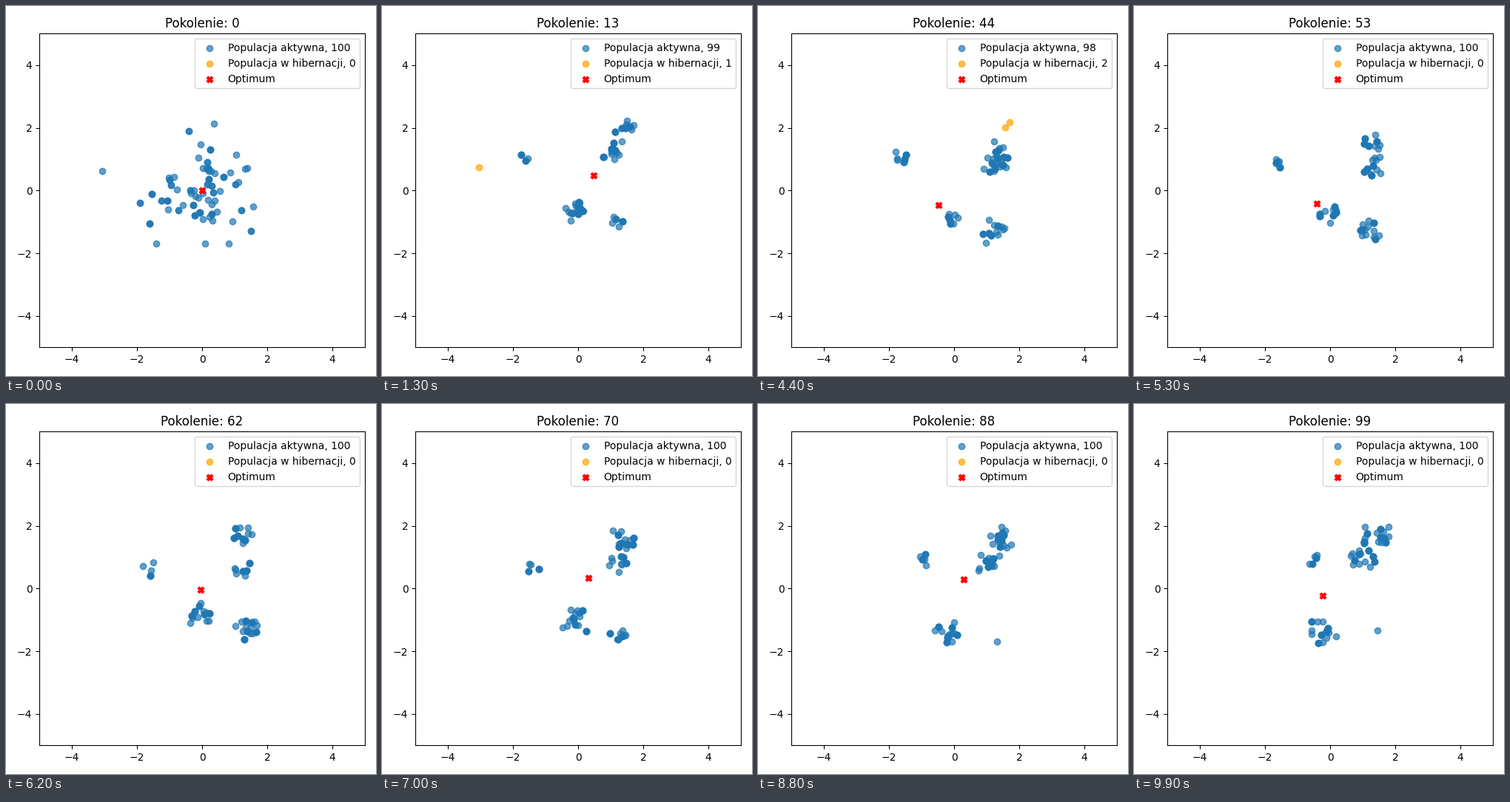
Write a matplotlib script that moves like this. It is 500 px wide and 500 px high and loops after 10 s.

```python
import numpy as np
import matplotlib.pyplot as plt
from matplotlib.animation import FuncAnimation

SIZE = 100           # individuals per generation
GENERATIONS = 100
LIFESPAN = 3         # generations a genotype survives
SETTLED = 10         # generation when the first cloud has died out
GOLDEN = .618034

# Where each niche lies and how many genotypes it holds, at a few generations.
STOPS = [13, 29, 44, 62, 78, 99]
NICHES = {
    "north": [(1.43, 1.95, 6), (1.65, 1.92, 4), (1.3, 1.4, 4),
              (1.28, 1.65, 10), (1.45, 1.6, 14), (1.42, 1.6, 14)],
    "east": [(.97, 1.25, 10), (1, 1.3, 12), (1.33, .9, 18),
             (1.25, .6, 7), (1.1, .92, 13), (1, .95, 14)],
    "west": [(-1.7, 1, 2), (-1.53, 1.19, 3), (-1.57, 1, 6),
             (-1.6, .63, 5), (-1.22, .85, 4), (-.57, .96, 4)],
    "south": [(-.2, -.55, 13), (-.1, -.6, 18), (0, -.8, 7),
              (0, -.75, 14), (-.22, -1.25, 14), (-.2, -1.43, 15)],
    "corner": [(1.25, -1, 4), (1.4, -1.25, 20), (1.2, -1.3, 13),
               (1.3, -1.35, 16), (1.25, -1.74, 2), (1.43, -1.47, 2)],
}
PATHS = np.array(list(NICHES.values()))

# first generation, last generation, x, y
HIBERNATING = [(1, 20, -3.05, .74), (19, 24, -2.25, .8), (41, 47, 1.57, 2.01),
               (43, 49, 1.7, 2.18), (55, 58, 1.75, 1.9)]

rng = np.random.default_rng(7)
cloud = np.clip(rng.normal((.2, .1), (.95, .9), (64, 2)), (-1.9, -1.7), (2.3, 2.2))
cloud[-1] = -3.08, .62
death = rng.uniform(0, SETTLED, len(cloud))
death[death.argmin()] = 0


def niches(g):
    """Centres and shares of all niches in generation g."""
    now = np.array([[np.interp(g, STOPS, column) for column in path.T] for path in PATHS])
    return now[:, :2], now[:, 2] / now[:, 2].sum()


def genotype(slot, g):
    if g == 0 or (slot < len(cloud) - 1 and g < death[slot]):
        return cloud[slot]
    centres, shares = niches(g)
    home = np.searchsorted(shares.cumsum()[:-1], slot * GOLDEN % 1)
    birth = g - (g + slot) % LIFESPAN + LIFESPAN
    step = np.random.default_rng([slot, birth]).normal(size=2).clip(-1.8, 1.8)
    return centres[home] + .38 * np.sqrt(shares[home]) * step


def population(g):
    distinct = int(np.interp(g, [0, SETTLED], [len(cloud), 48]))
    genes = np.array([genotype(slot, g) for slot in range(distinct)])
    clones = np.resize(genes[:int(.4 * distinct)], (SIZE - distinct, 2))
    return np.vstack([genes, clones]).clip((-3.1, -1.82), (2.4, 2.25))


fig, ax = plt.subplots(figsize=(5, 5), dpi=100)
ax.set(xlim=(-5, 5), ylim=(-5, 5))
title = ax.set_title("Pokolenie: 0")
active = ax.scatter([], [], color="tab:blue", alpha=.7, label="Populacja aktywna, 100")
asleep = ax.scatter([], [], color="orange", alpha=.7, label="Populacja w hibernacji, 0")
optimum = ax.scatter([0], [0], color="red", marker="X", label="Optimum")
legend = ax.legend(loc="upper right")
fig.tight_layout()


def update(g):
    sleepers = [(x, y) for first, last, x, y in HIBERNATING if first <= g <= last]
    awake = SIZE - len(sleepers)
    active.set_offsets(population(g)[:awake])
    asleep.set_offsets(np.reshape(sleepers, (-1, 2)))
    best = .5 * np.sin(.1 * g)
    optimum.set_offsets([(best, best)])
    title.set_text(f"Pokolenie: {g}")
    labels = legend.get_texts()
    labels[0].set_text(f"Populacja aktywna, {awake}")
    labels[1].set_text(f"Populacja w hibernacji, {len(sleepers)}")
    return active, asleep, optimum, title


anim = FuncAnimation(fig, update, frames=GENERATIONS, interval=100, repeat=True)
plt.show()
```
